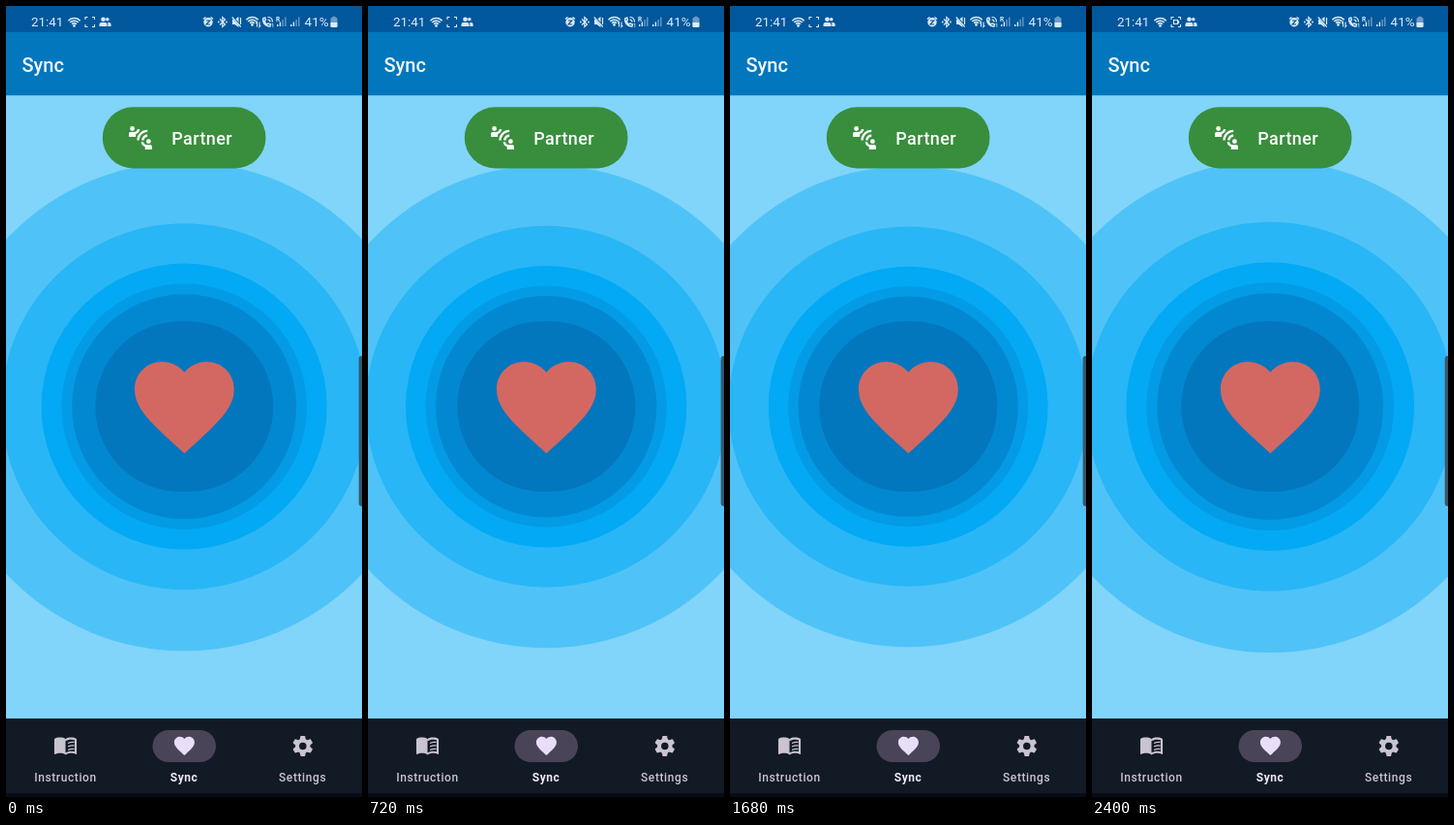
An HTML page with a canvas that plays this animation: 368x816 px, repeating every 2.52 s.

```html
<!DOCTYPE html>
<html lang="en">
<head>
<meta charset="utf-8">
<title>Sync</title>
<style>
html, body { margin: 0; width: 100%; height: 100%; overflow: hidden; background: #81d4fa; }
canvas { display: block; width: 368px; height: 816px; }
</style>
</head>
<body>
<canvas id="stage"></canvas>
<script>
const W = 368, H = 816, LOOP = 2520, STEP = 120;
const canvas = document.getElementById('stage');
const ctx = canvas.getContext('2d');
const dpr = window.devicePixelRatio || 1;
canvas.width = W * dpr;
canvas.height = H * dpr;

const HEART = new Path2D('M12 21.35l-1.45-1.32C5.4 15.36 2 12.28 2 8.5 2 5.42 4.42 3 7.5 3c1.74 0 3.41.81 4.5 2.09C13.09 3.81 14.76 3 16.5 3 19.58 3 22 5.42 22 8.5c0 3.78-3.4 6.86-8.55 11.54L12 21.35z');
const BOOK = new Path2D('M21 5c-1.11-.35-2.33-.5-3.5-.5-1.95 0-4.05.4-5.5 1.5-1.45-1.1-3.55-1.5-5.5-1.5S2.45 4.9 1 6v14.65c0 .25.25.5.5.5 1.6-.7 3.55-1.15 5-1.15 1.95 0 4.05.4 5.5 1.5 1.35-.85 3.8-1.5 5.5-1.5 1.65 0 3.35.3 4.75 1.05.4.15.75-.1.75-.45V6c-.6-.45-1.25-.75-2-1zm0 13.5c-1.1-.35-2.3-.5-3.5-.5-1.7 0-4.15.65-5.5 1.5V8c1.35-.85 3.8-1.5 5.5-1.5 1.2 0 2.4.15 3.5.5v11.5z');
const PAIR = new Path2D('M11 14H9c0-4.97 4.03-9 9-9v2c-3.87 0-7 3.13-7 7zm7-3V9c-2.76 0-5 2.24-5 5h2c0-1.66 1.34-3 3-3zM7 4a2 2 0 1 0-4 0 2 2 0 0 0 4 0zm4.45.5h-2C9.21 5.92 7.99 7 6.5 7h-3C2.67 7 2 7.67 2 8.5V11h6V8.74c1.86-.59 3.25-2.23 3.45-4.24zM19 17a2 2 0 1 0 0-4 2 2 0 0 0 0 4zm1.5 1h-3c-1.49 0-2.71-1.08-2.95-2.5h-2c.2 2.01 1.59 3.65 3.45 4.24V22h6v-2.5c0-.83-.67-1.5-1.5-1.5z');

// [smallest radius, growth, colour]
const RINGS = [
  [246, 8, '#4fc3f7'],
  [184, 6.5, '#29b6f6'],
  [143, 6, '#03a9f4'],
  [122.5, 5.5, '#039be5'],
  [112.5, 4.5, '#0288d1']
];
// [tick, swell]
const BEAT = [[0, .77], [4, .18], [5, .06], [8, 1], [9, 1.02], [12, .76], [15, 0], [17, .48], [20, .98]];

function swell(tick) {
  let i = 0;
  while (i < BEAT.length - 2 && BEAT[i + 1][0] < tick) i++;
  const [t0, a] = BEAT[i], [t1, b] = BEAT[i + 1];
  return a + (b - a) * (tick - t0) / (t1 - t0);
}

function rect(x, y, w, h, color, r = 0) {
  ctx.fillStyle = color;
  ctx.beginPath();
  ctx.roundRect(x, y, w, h, r);
  ctx.fill();
}

function disc(x, y, r, color) {
  ctx.fillStyle = color;
  ctx.beginPath();
  ctx.arc(x, y, r, 0, Math.PI * 2);
  ctx.fill();
}

function text(str, x, y, font, color, spacing = 0) {
  ctx.font = font + ' Roboto, sans-serif';
  ctx.letterSpacing = spacing + 'px';
  ctx.fillStyle = color;
  ctx.fillText(str, x, y);
}

function icon(path, x, y, scale, color) {
  ctx.save();
  ctx.translate(x, y);
  ctx.scale(scale, scale);
  ctx.fillStyle = color;
  ctx.fill(path, 'evenodd');
  ctx.restore();
}

function line(d, color, width = 1.2) {
  ctx.strokeStyle = color;
  ctx.lineWidth = width;
  ctx.stroke(new Path2D(d));
}

function gear(x, y, color, hole) {
  ctx.save();
  ctx.translate(x, y);
  disc(0, 0, 7.7, color);
  for (let i = 0; i < 6; i++) {
    ctx.beginPath();
    ctx.moveTo(-3.2, -6);
    ctx.lineTo(-2.4, -10.1);
    ctx.lineTo(-1.9, -10.5);
    ctx.lineTo(1.9, -10.5);
    ctx.lineTo(2.4, -10.1);
    ctx.lineTo(3.2, -6);
    ctx.fill();
    ctx.rotate(Math.PI / 3);
  }
  disc(0, 0, 3.75, hole);
  ctx.restore();
}

function wifi(x, y, color) {
  ctx.strokeStyle = color;
  ctx.lineWidth = 1.5;
  for (const r of [3.2, 5.8, 8.4]) {
    ctx.beginPath();
    ctx.arc(x, y, r, -Math.PI * .76, -Math.PI * .24);
    ctx.stroke();
  }
  disc(x, y - .6, 1.3, color);
}

function bars(x, color) {
  for (let i = 0; i < 4; i++) {
    const h = 2 + i * 2.5;
    rect(x + i * 2.7, 21 - h, 1.4, h, i < 2 ? color : '#6b9cc5');
  }
}

function statusBar(recording) {
  const c = '#dceaf6', bg = '#01579b';
  rect(0, 0, W, 27, bg);
  text('21:41', 26, 21, '13.4px', c);
  wifi(70.5, 21, c);

  line('M82 14v-2.5h2.5M89 11.5h2.5v2.5M91.500 19v2.500h-2.500M84.500 21.500h-2.500v-2.500', c, 1.1);
  if (recording) {
    line('M84.500 14.500h4v4h-4z', c, 1.1);
    line('M89.500 15v3', c, 1.2);
  }

  disc(100.5, 13.8, 2.3, c);
  rect(96.5, 17, 8, 4, c, [2, 2, 0, 0]);
  disc(104.8, 13.8, 1.8, c);
  rect(105.3, 17, 3.3, 4, c, [0, 2, 0, 0]);

  disc(209, 16.7, 4.7, c);
  line('M204 13.500l2.500-2M214 13.500l-2.500-2', c, 1.5);
  line('M207 15h3.800l-3.800 4h4', bg, 1.1);

  line('M221 13.500l5.500 5.500-2.700 2.500v-10l2.700 2.500-5.500 5.500', c, 1.2);
  disc(219.8, 16.5, .9, c);
  disc(228, 16.5, .9, c);

  ctx.fillStyle = c;
  ctx.fill(new Path2D('M234 14h2.500l4-3v11l-4-3h-2.500z'));
  line('M234 11l9.500 11', bg, 2.2);
  line('M233.700 11.500l9 10M242.500 12v7', c, 1.2);

  wifi(254.5, 20, c);
  line('M259.500 21.500v-5l-1.300 1.500M262 16.500v5l1.300-1.500', c, 1.1);

  line('M266 12.500c-1.500 4 2.500 9 7 8.500l.5-2-2.500-1-1.300 1c-1.500-.8-2.200-2-2.500-3.500l1.200-1-.5-2.500z', c, 1.4);
  line('M270.500 11.500c3 0 5 2 5 5M270.500 14c1.500 0 2.500 1 2.500 2.500', c, 1.2);
  text('1', 274, 22, '500 6px', c);

  text('R', 279, 15.5, '700 6.5px', c);
  bars(280, c);
  bars(294, c);
  text('41%', 308.6, 21, '13.4px', c);

  rect(335.5, 12, 7, 10, '#6b9cc5', 1.2);
  rect(337.3, 10.8, 3.4, 1.5, '#6b9cc5');
  rect(335.5, 17, 7, 5, c, [0, 0, 1.2, 1.2]);
}

function navBar() {
  const bg = '#121a26', dim = '#cac4d0', lit = '#e8def8';
  rect(0, 735, W, 81, bg);
  rect(0, 812, W, 4, '#080a18');
  rect(151.5, 747, 65.5, 33, '#4a4458', 16.5);

  icon(BOOK, 48.9, 749.85, 1.05, dim);
  line('M64 760.500q3.500-1.600 6.500-1M64 764q3.500-1.600 6.500-1M64 767.500q3.500-1.600 6.500-1', dim, 1.3);
  icon(HEART, 171.8, 750.6, 1.05, lit);
  gear(306.8, 763.4, dim, bg);

  text('Instruction', 29.2, 800, '500 12px', dim, .6);
  text('Sync', 169.8, 800, '700 12px', '#f0eaf8', .5);
  text('Settings', 282, 800, '500 12px', dim, .6);
}

function draw(time) {
  const tick = Math.floor((time % LOOP) / STEP);
  const p = swell(tick);
  ctx.setTransform(dpr, 0, 0, dpr, 0, 0);

  rect(0, 0, W, H, '#81d4fa');
  for (const [r, grow, color] of RINGS) disc(184.2, 413.2, r + grow * p, color);
  rect(92.3, 325.3, 184, 175.7, '#0277bd', 87.8);
  icon(HEART, 122.7, 351.7, 5.14, '#d36862');

  rect(0, 27, W, 65.3, '#0277bd');
  text('Sync', 16.5, 67.5, '500 20px', '#f4f9fd');

  rect(99.8, 104.3, 168.7, 63.2, '#388e3c', 31.6);
  icon(PAIR, 124.6, 121.7, 1.2, '#fff');
  text('Partner', 171.3, 143, '500 18px', '#fff', .4);

  rect(364.7, 361, 6, 155, '#37596e', 3);

  const blink = tick % 7.4;
  statusBar(blink >= 2.1 && blink < 5.8);
  navBar();
}

let start;
function loop(now) {
  if (start === undefined) start = now;
  draw(Math.max(0, now - start));
  requestAnimationFrame(loop);
}
draw(0);
requestAnimationFrame(loop);
</script>
</body>
</html>
```
